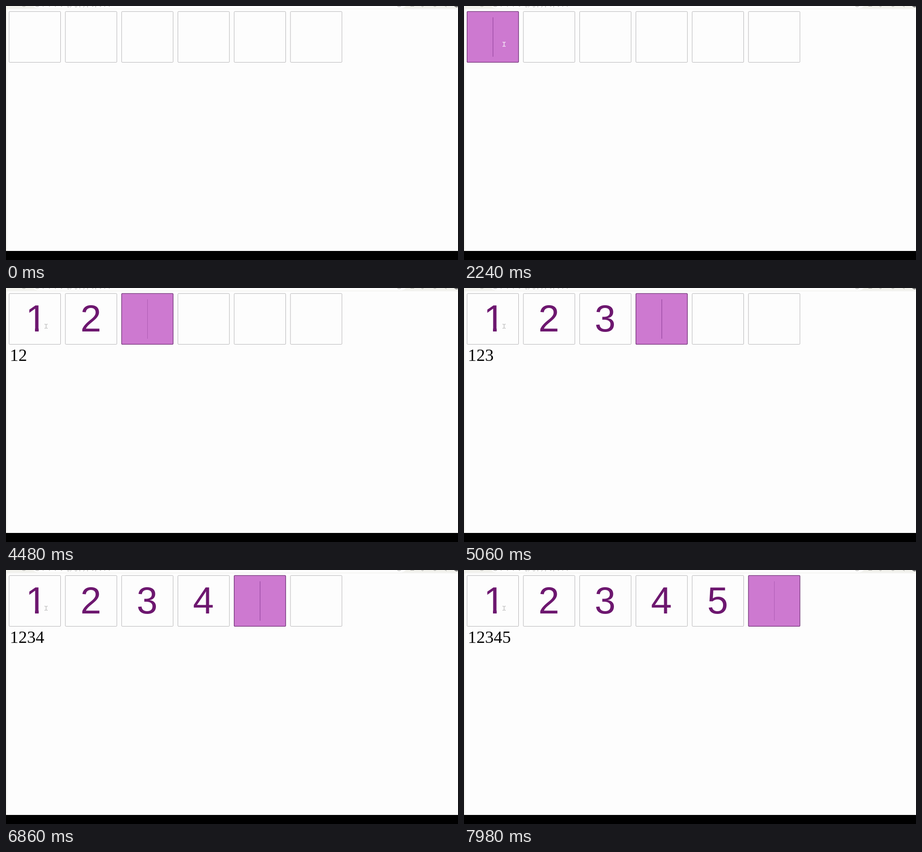
Write an HTML page that moves like this. It is 998 by 561 pixels and loops after 8 s.

```html
<!DOCTYPE html>
<html lang="en">
<head>
<meta charset="utf-8">
<title>Code entry</title>
<style>
  html, body { margin: 0; width: 100%; height: 100%; overflow: hidden; background: #fdfdfd; }
  svg { display: block; width: 998px; height: 561px; }
  .box { fill: #fdfdfd; stroke: #b3b2b4; stroke-width: 1; }
  .focus .box { fill: #cd79d0; stroke: #692a70; stroke-width: 1.3; }
  .caret { stroke: #7b2f87; stroke-width: 1; visibility: hidden; }
  .focus .caret { visibility: visible; }
  .digit { font: 83px "Liberation Sans", Arial, sans-serif; fill: #6d176f; text-anchor: middle; }
  #sum { font: 38px "Liberation Serif", "Times New Roman", serif; fill: #060606; }
  #pointer { fill: none; stroke: #a3a3a3; stroke-width: 1; }
  #pointer.bright { stroke: #f4e6f5; stroke-width: 1.6; }
  .mark { fill: none; stroke: #a6a6a2; stroke-width: 1; }
</style>
</head>
<body>
<svg viewBox="0 0 998 561">
  <defs>
    <!-- trims the foot of the numeral one -->
    <clipPath id="footless"><path d="M30 20H90V89H72.2V100H64V89H30Z"/></clipPath>
  </defs>
  <rect width="998" height="561" fill="#fdfdfd"/>
  <rect width="2.5" height="541" fill="#f3f3ef"/>
  <path d="M0 0H60Q63 4 70 5.5H0ZM883 0H998V5.5H873Q880 4 883 0Z" fill="#f2f2ed"/>
  <path d="M0 6.5H998" stroke="#ecece8"/>
  <g class="mark">
    <path d="M36 0q3.500 3 7 0M65 0q4 3 8 0M864 0q4 3.500 8 0M893 .5h8M917 0l3 2l2-2M944 0q3 3 6 0M969 0l4 2"/>
    <path d="M81 .5h2M95 .5h2M108 .5h2M121 .5h3M135 1q2 3 5 0M144 0l-2 3M152 1q2 3 5 0M163 0v3M173 0l-2 3M180 0v3M190 .5h3M198 0v3M207 .5h3M217 .5h2M227 .5h2"/>
  </g>
  <path d="M989 0q5 5 9 2V0Z" fill="#777"/>
  <g id="cells"></g>
  <text id="sum" x="8.5" y="161"></text>
  <path id="pointer" d="M85 80H87.500L88.500 81L89.500 80H92M88.500 81V88M85 89H87.500L88.500 88L89.500 89H92"/>
  <rect y="541" width="998" height="20" fill="#000"/>
</svg>
<script>
const LOOP = 8000;
const COUNT = 6;
const PITCH = 124.25;
const FOCUS_AT = 1680;
const TYPED_AT = [3240, 4480, 5060, 6140, 7000];
// time, caret opacity
const CARET = [[0, .85], [4480, .4], [4620, .85], [7540, .85], [7980, .4]];

const byId = id => document.getElementById(id);

byId("cells").innerHTML = Array.from({ length: COUNT }, (_, i) => {
  const numeral = i === 0
    ? `<g clip-path="url(#footless)"><text class="digit" x="66.6" y="96"></text></g>`
    : `<text class="digit" x="63" y="96"></text>`;
  return `<g class="cell" transform="translate(${i * PITCH})">
    <rect class="box" x="6.8" y="12.2" width="113.7" height="112.2" rx="1.5"/>
    <path class="caret" d="M64 25V112"/>${numeral}</g>`;
}).join("");

const cells = [...document.querySelectorAll(".cell")];
const digits = cells.map(cell => cell.querySelector(".digit"));
const carets = cells.map(cell => cell.querySelector(".caret"));

function caretOpacity(t) {
  const next = CARET.findIndex(([time]) => time > t);
  if (next < 0) return CARET[CARET.length - 1][1];
  const [t0, a] = CARET[next - 1], [t1, b] = CARET[next];
  // the first stretch holds its value
  return next === 1 ? a : a + (b - a) * (t - t0) / (t1 - t0);
}

function draw(t) {
  const typed = TYPED_AT.filter(time => t >= time).length;
  const focused = t >= FOCUS_AT;
  cells.forEach((cell, i) => {
    cell.classList.toggle("focus", focused && i === typed);
    digits[i].textContent = i < typed ? i + 1 : "";
    carets[i].style.opacity = caretOpacity(t);
  });
  byId("sum").textContent = "123456".slice(0, typed);
  byId("pointer").style.display = focused ? "" : "none";
  byId("pointer").classList.toggle("bright", typed === 0);
}

const start = performance.now();
function tick() {
  draw((performance.now() - start) % LOOP);
  requestAnimationFrame(tick);
}
tick();
</script>
</body>
</html>
```
